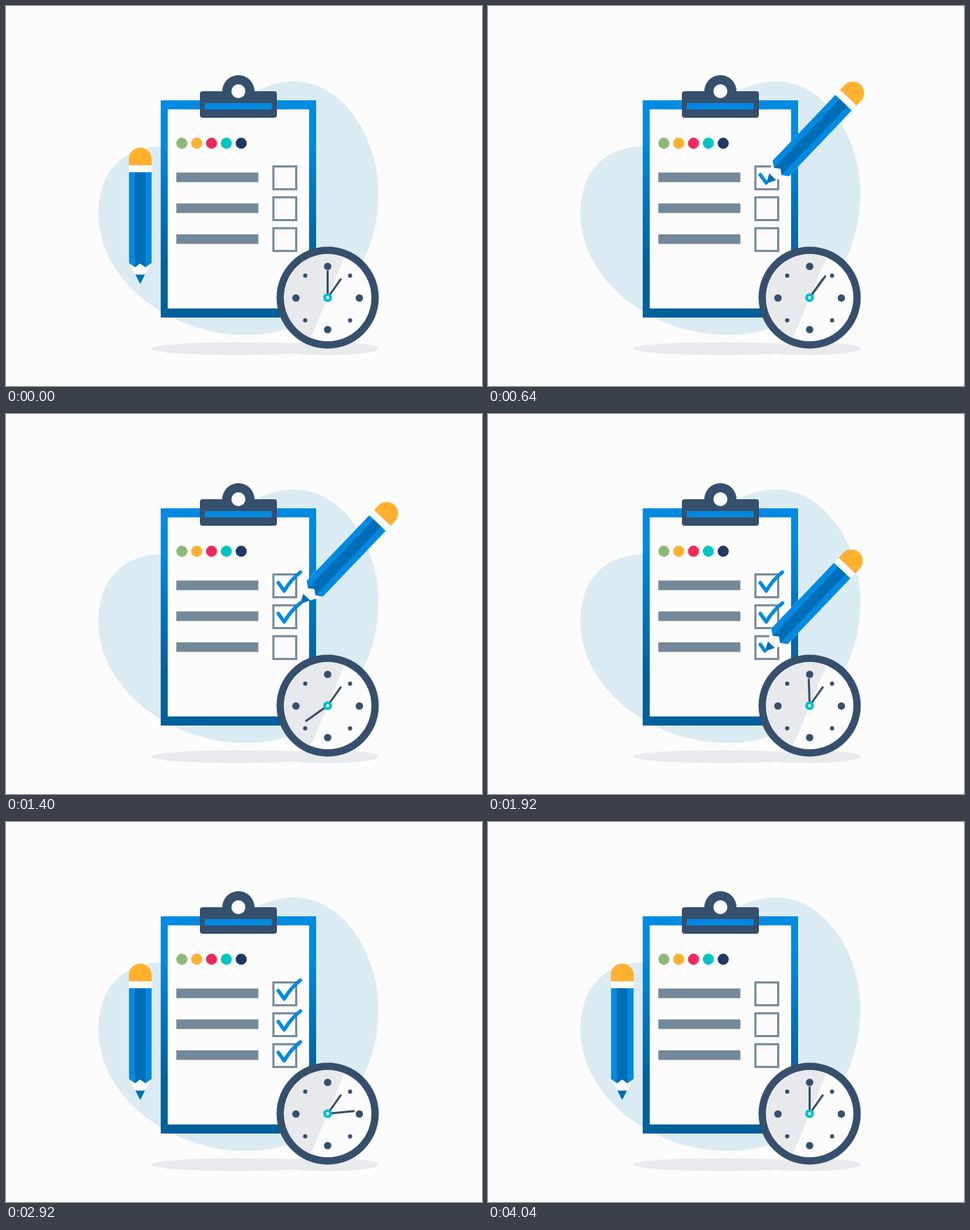
An HTML page that plays this animation: 680 px wide and 544 px high, repeating every 5000 ms.

```html
<!DOCTYPE html>
<html lang="en">
<head>
<meta charset="utf-8">
<title>Checklist</title>
<style>
html, body { margin: 0; width: 100%; height: 100%; overflow: hidden; background: #fcfcfc; }
svg { display: block; width: 680px; height: 544px; }
</style>
</head>
<body>
<svg viewBox="0 0 680 544">
  <defs>
    <linearGradient id="frame" x1="0" y1="0" x2="0" y2="1">
      <stop offset=".17" stop-color="#018ae2"/>
      <stop offset=".75" stop-color="#00609c"/>
    </linearGradient>
    <g id="list"></g>
  </defs>
  <path fill="#dbebf3" d="M411 108C480 108 532 185 532 270C532 380 450 471 345 471C230 471 132 390 132 297C132 240 165 201 222 201C290 201 330 108 411 108Z"/>
  <g fill="#e8eaed">
    <ellipse cx="333" cy="490.5" rx="125.5" ry="9.3"/>
    <ellipse cx="459.5" cy="490.5" rx="73" ry="9.3"/>
  </g>

  <path fill="url(#frame)" d="M221 135H443V446H221Z"/>
  <use href="#list"/>
  <g id="sheet">
    <use href="#list"/>
    <g id="checks" fill="none" stroke="#018ae2" stroke-width="5.2" stroke-linecap="round" stroke-linejoin="round"></g>
  </g>

  <g fill="#364f6c">
    <circle cx="332" cy="122" r="23"/>
    <rect x="277" y="122" width="110" height="38" rx="4"/>
    <circle cx="332" cy="122" r="10" fill="#fcfcfc"/>
    <path fill="#018ae2" d="M284 139H379.5V148H284Z"/>
  </g>

  <!-- drawn with its point at the origin -->
  <g id="pencil">
    <path fill="#fcfcfc" d="M-16 -170H16.3V-30L6.5 -13H-6.5L-16 -30Z"/>
    <path fill="#ffb02f" d="M-16.2 -170V-179A16.3 16.3 0 0 1 16.4 -179V-170Z"/>
    <path fill="#018ae2" d="M-16 -160H16.3V-30L7.5 -24L0 -29.5L-7.5 -24L-16 -30Z"/>
    <path fill="#006eb7" d="M-7.5 -160H7.5V-24L0 -29.5L-7.5 -24ZM-6.8 -13.5H6.8L0 0Z"/>
  </g>

  <g id="clock" transform="translate(459.5 417.5)" fill="#364f6c">
    <circle r="73"/>
    <circle r="62.5" fill="#fcfcfc"/>
    <path fill="#e7e9ec" d="M24 -57.7A62.5 62.5 0 0 0 -24 57.7Z"/>
    <g id="marks"></g>
    <path d="M0 0L19.3 -27.2" stroke="#364f6c" stroke-width="3"/>
    <path id="minute" d="M0 0V-38.8" stroke="#364f6c" stroke-width="3"/>
    <circle r="4.3" fill="#fcfcfc" stroke="#00bccb" stroke-width="4"/>
  </g>
</svg>
<script>
const $ = id => document.getElementById(id);
const rows = [0, 44.2, 88.4];
const tick = 'M389 241.5L397.5 253.3Q407 237 420.5 226.5';

$('list').innerHTML =
  '<path fill="#fcfcfc" d="M231 148H433V433H231Z"/>' +
  ['#8aba78', '#ffb02f', '#ee2a5c', '#00c4c4', '#1f3a5f'].map((c, i) =>
    `<circle cx="${251.2 + 21.2 * i}" cy="196.5" r="7.9" fill="${c}"/>`).join('') +
  rows.map(y =>
    `<rect x="243.3" y="${238.4 + y}" width="117.2" height="13.8" fill="#738999"/>
     <rect x="382" y="${229.7 + y}" width="32.6" height="32.6" fill="none" stroke="#738999" stroke-width="3"/>`).join('');

$('checks').innerHTML = rows.map(y =>
  `<path d="${tick}" transform="translate(0 ${y})"/>`).join('');
const checks = [...$('checks').children];
const tickLength = checks[0].getTotalLength();

for (let i = 0; i < 8; i++) {
  const a = i * Math.PI / 4;
  $('marks').innerHTML +=
    `<circle cx="${45.3 * Math.sin(a)}" cy="${0.5 - 45.3 * Math.cos(a)}" r="${i % 2 ? 3 : 5.3}"/>`;
}

const ramp = (t, a, b) => Math.min(1, Math.max(0, (t - a) / (b - a)));
const smooth = u => u * u * (3 - 2 * u);
const ease = (t, a, b) => smooth(ramp(t, a, b));
const mix = (p, q, u) => p.map((v, i) => v + (q[i] - v) * u);

// cubic-bezier(.657, 0, .68, 1)
function swing(x) {
  let lo = 0, hi = 1;
  for (let i = 0; i < 24; i++) {
    const s = (lo + hi) / 2, r = 1 - s;
    if (3 * r * r * s * .657 + 3 * r * s * s * .68 + s ** 3 < x) lo = s; else hi = s;
  }
  return smooth(lo);
}

const rest = [191.7, 398, 0];
const starts = [570, 1210, 1860], drawTime = 200;
const leaves = [900, 1540, 2240], arrivals = [1210, 1860, 2840];

function tipAt(row, part) {
  const p = checks[row].getPointAtLength(tickLength * part);
  return [p.x, p.y + rows[row] + 1, 43.6];
}

function pencilPose(t) {
  if (t < starts[0]) return mix(rest, tipAt(0, 0), ease(t, 0, starts[0]));
  const row = t < starts[1] ? 0 : t < starts[2] ? 1 : 2;
  if (t < leaves[row]) return tipAt(row, ease(t, starts[row], starts[row] + drawTime));
  const next = row < 2 ? tipAt(row + 1, 0) : rest;
  return mix(tipAt(row, 1), next, ease(t, leaves[row], arrivals[row]));
}

function draw(t) {
  const [x, y, angle] = pencilPose(t);
  $('pencil').setAttribute('transform', `translate(${x} ${y}) rotate(${angle})`);

  checks.forEach((check, i) => {
    const part = ease(t, starts[i], starts[i] + drawTime);
    check.setAttribute('visibility', part > 0 ? 'inherit' : 'hidden');
    check.setAttribute('stroke-dasharray', `${tickLength * part} 100`);
  });

  const fall = ease(t, 2920, 3400);
  $('sheet').setAttribute('transform', `translate(0 ${115 * fall})`);
  $('sheet').setAttribute('opacity', 1 - fall);
  $('sheet').setAttribute('visibility', fall < 1 ? 'visible' : 'hidden');

  const turn = t < 4000 ? swing(t % 2000 / 2000) : 0;
  $('minute').setAttribute('transform', `rotate(${360 * turn})`);
}

const begin = performance.now();
function loop() {
  draw((performance.now() - begin) % 5000);
  requestAnimationFrame(loop);
}
loop();
</script>
</body>
</html>
```
